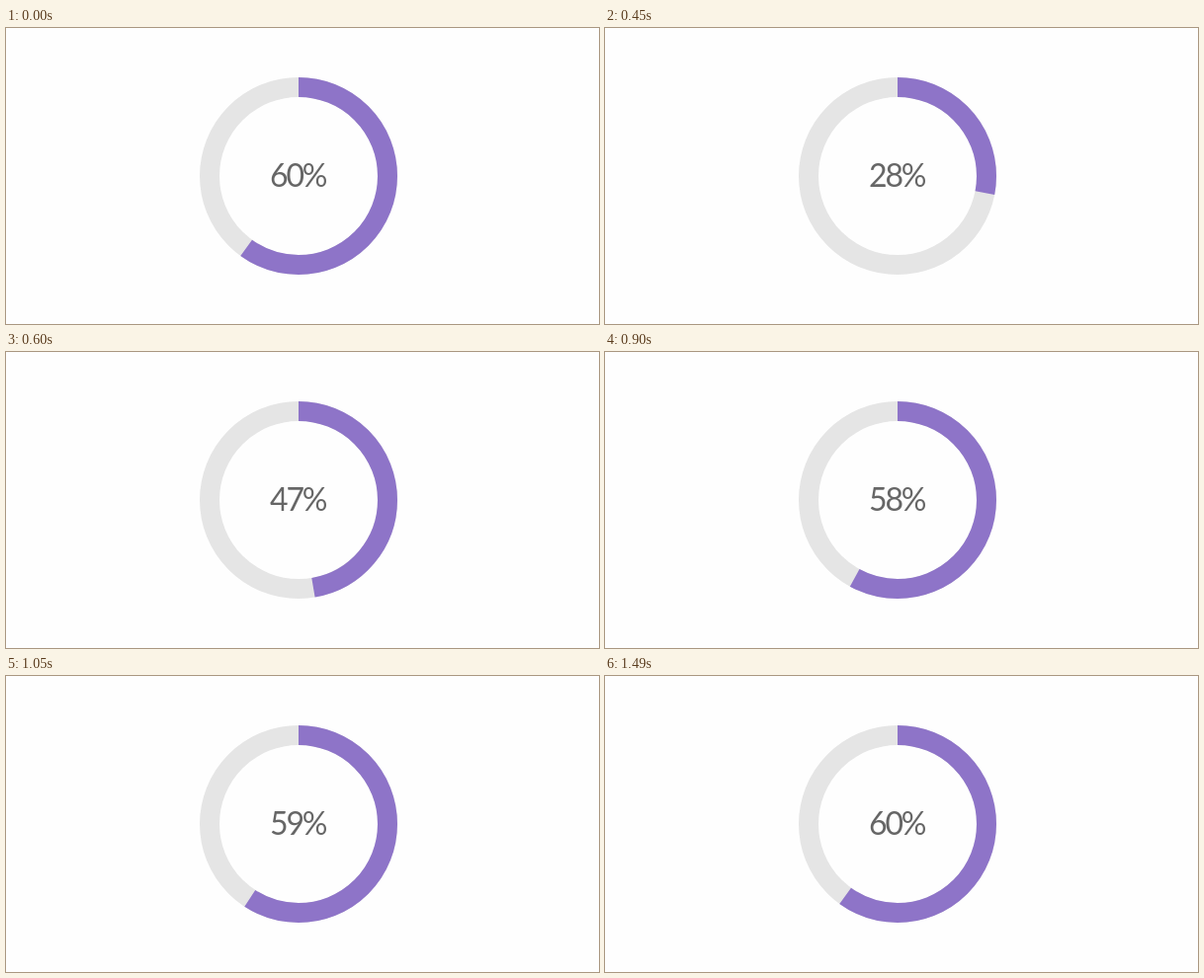
Recreate the animation shown at these times as an HTML page. Size 600x300 px, loop 4.45 s.

```html
<!DOCTYPE html>
<html lang="en">
<head>
<meta charset="utf-8">
<title>Progress ring</title>
<style>
  html, body { margin: 0; height: 100%; overflow: hidden; background: #fefefe; }
  svg { display: block; width: 100%; height: 100%; }
  circle { fill: none; stroke: #e5e5e5; stroke-width: 20; }
  #bar { stroke: #8e74c8; }
  text { font: 400 32px Lato, sans-serif; letter-spacing: -2.1px; fill: #666; text-anchor: middle; }
</style>
</head>
<body>
<svg viewBox="0 0 600 300">
  <circle cx="296" cy="150" r="90"/>
  <circle id="bar" cx="296" cy="150" r="90" pathLength="100" transform="rotate(-90 296 150)"/>
  <text id="label" x="295.2" y="160.5"></text>
</svg>
<script>
  const LOOP = 4450, START = 300, STEP = 149;
  const GOAL = 60, FIRST = 0.48;  // percent
  const DELAY = 0.32, RATE = 0.926;  // in steps: lag before moving, decay of the gap
  const bar = document.getElementById('bar');
  const label = document.getElementById('label');

  // The gap to the goal shrinks exponentially, redrawn in steps on a 10 ms clock.
  function percentAt(time) {
    const clock = Math.floor(time / 10) * 10 + 4;
    const step = Math.floor((clock - START) / STEP);
    if (step < 0) return GOAL;
    const gap = GOAL * Math.exp(-RATE * (step - DELAY));
    return gap < 0.1 ? GOAL : Math.max(FIRST, GOAL - gap);
  }

  function draw(time) {
    const percent = percentAt(time);
    bar.setAttribute('stroke-dasharray', `${percent} 100`);
    label.textContent = `${Math.floor(percent)}%`;
  }

  const origin = performance.now();
  function tick() {
    draw((performance.now() - origin) % LOOP);
    requestAnimationFrame(tick);
  }
  tick();
</script>
</body>
</html>
```
